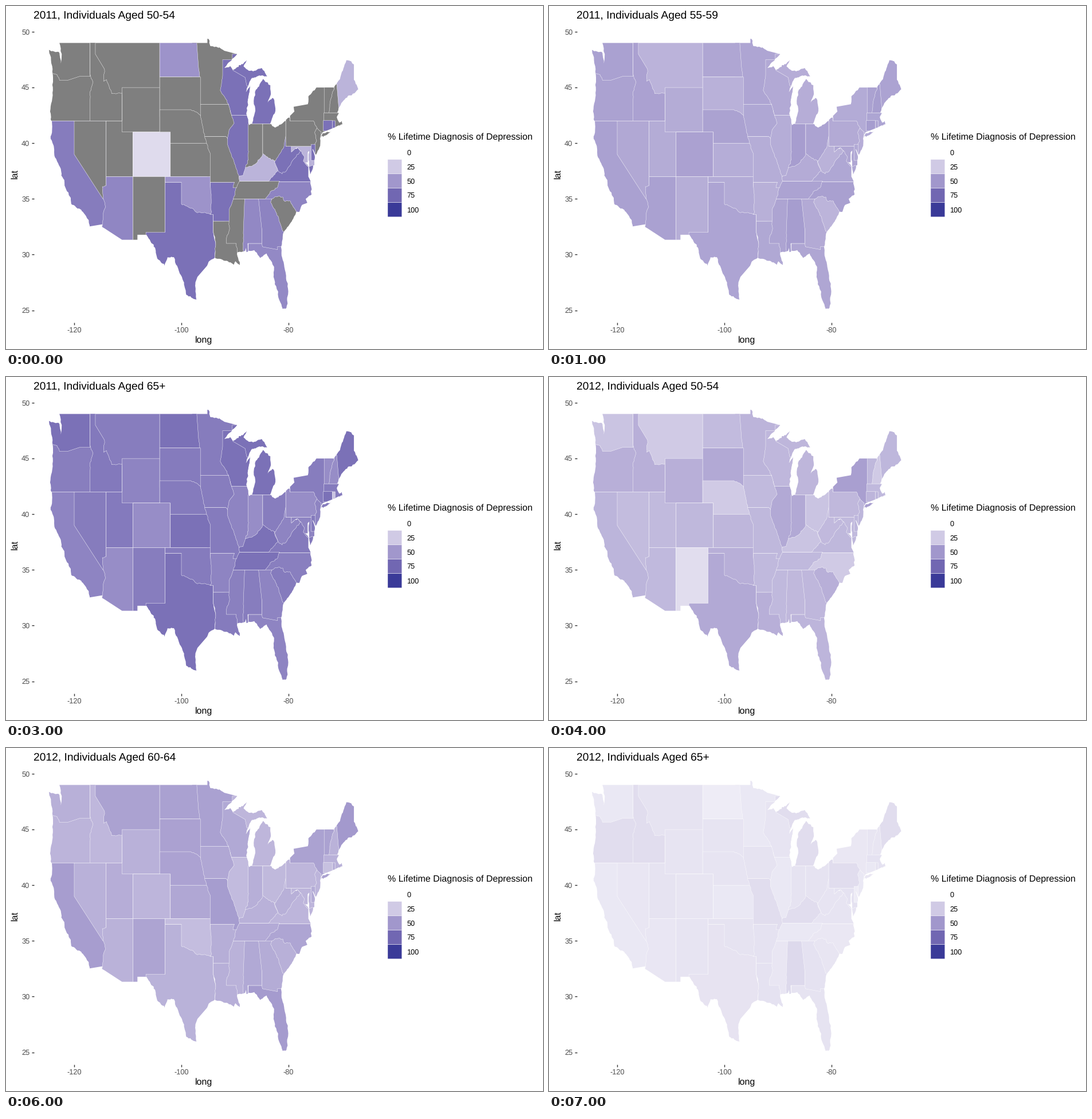
A matplotlib script for the animation above (8000 ms loop, 937 by 598 pixels).

```python
import numpy as np
import matplotlib.pyplot as plt
from matplotlib.animation import FuncAnimation
from matplotlib.patches import Polygon, Rectangle
from matplotlib.path import Path

W, H, DPI = 937, 598, 128
AGES = ["50-54", "55-59", "60-64", "65+"]
LONG_EDGE = 2  # degrees; longer edges stay straight
rng = np.random.default_rng(4)

plt.rcParams.update({"font.family": "Liberation Sans", "text.hinting": "none"})
fig = plt.figure(figsize=(W / DPI, H / DPI), dpi=DPI, facecolor="white")
ax = fig.add_axes([0, 0, 1, 1])
ax.set(xlim=(0, W), ylim=(H, 0))
ax.axis("off")


def px(west):
    return 306 + 9.35 * (100 - west)


def py(lat):
    return 45 + 19.42 * (50 - lat)


def shade(value):
    """White to deep blue; missing values are grey."""
    if value is None:
        return "#7f7f7f"
    stops = [0, 25, 50, 75, 100]
    r = np.interp(value, stops, [255, 208, 161, 113, 58])
    g = np.interp(value, stops, [255, 202, 151, 103, 58])
    b = np.interp(value, stops, [255, 229, 204, 178, 152])
    return (r / 255, g / 255, b / 255)


def label(x, y, text, size, color="black", **kw):
    return ax.text(x, y, text, fontsize=size * 72 / DPI, color=color, va="baseline", **kw)


def outline(numbers):
    """Pixel outline of (west, lat) pairs; short slanted edges wander like coasts and rivers."""
    points = np.reshape(numbers, (-1, 2)).astype(float)
    path = []
    for p, q in zip(points, np.roll(points, -1, axis=0)):
        path.append(p)
        length = np.hypot(*(q - p))
        if np.all(p != q) and length < LONG_EDGE:
            for t in np.arange(0.25, length - 0.1, 0.25) / length:
                path.append(p + t * (q - p) + rng.normal(0, (0.05, 0.03)))
    west, lat = np.transpose(path)
    return np.column_stack([px(west), py(lat)])


# Land outline, counterclockwise from the northwest
pacific = [
    122.76, 49, 122.5, 48.5, 122.35, 47.7, 122.5, 47.15, 122.75, 48.1, 124.7, 48.38,
    124.1, 46.9, 123.95, 45.5, 124.1, 44, 124.5, 42.85, 124.1, 41.5, 124.4, 40.4,
    123.8, 39.7, 123.7, 38.9, 122.5, 37.7, 122.4, 37.1, 121.85, 36.7, 121.8, 36.2,
    120.65, 35.1, 120.55, 34.55, 119.2, 34.15, 118.4, 33.85, 117.3, 33.1, 117.1, 32.53]
south = [
    114.72, 32.72, 114.8, 32.5, 111.07, 31.33, 108.2, 31.33, 108.2, 31.78, 106.5, 31.78,
    104.9, 30.6, 104.5, 29.65, 103.15, 29, 102.6, 29.75, 101.4, 29.77, 100.3, 28.3,
    99.5, 27.5, 99.1, 26.4, 97.2, 25.95]
gulf = [
    97.4, 27.3, 97, 28, 95.2, 29, 94.7, 29.45, 93.8, 29.72, 92.3, 29.53, 91.3, 29.4,
    90.2, 29.1, 89.9, 29.4, 89.1, 29.05, 89.5, 29.8, 89.6, 30.2, 88.1, 30.35, 87.95, 30.6,
    87.9, 30.25, 86.4, 30.4, 85.3, 29.7, 84.1, 30.1, 82.7, 28.9, 82.8, 28, 82.2, 26.9,
    81.75, 25.95, 81.1, 25.13, 80.4, 25.2]
atlantic = [
    80.05, 26.7, 80.55, 28.4, 81.3, 29.9, 81.4, 30.7, 80.9, 32.03, 79.3, 33.1, 78.55, 33.86,
    77.95, 33.87, 77.5, 34.45, 76.5, 34.65, 76.8, 35, 75.7, 35.4, 75.9, 36.6, 76.3, 37,
    76.3, 37.9, 77, 38.35, 76.45, 38.3, 76.45, 39.2, 76.1, 39.4, 76.25, 38.6, 75.97, 37.2,
    75.2, 38.05, 75.1, 38.75, 75.5, 39.5, 74.9, 38.95, 74.1, 39.75, 74.05, 40.6, 73.6, 41,
    71.5, 41.4, 70.65, 41.6, 69.95, 41.7, 70.1, 42, 70.55, 41.85, 71, 42.35, 70.65, 42.65,
    70.7, 43.1, 69.8, 43.8, 69, 44.2, 68.2, 44.3, 67, 44.85]
north = [
    67.45, 45.3, 67.8, 45.7, 67.8, 47.07, 68.3, 47.35, 69.2, 47.45, 70.05, 46.4, 70.4, 45.75,
    71.1, 45.3, 71.5, 45, 74.8, 45, 76.3, 44.2, 76.4, 43.5, 79.05, 43.27, 78.9, 42.85,
    81.2, 41.75, 82.5, 41.4, 83.45, 41.73]
lakes = [
    83.1, 42.2, 82.45, 42.9, 82.65, 43.85, 83, 44.07, 83.9, 43.65, 83.3, 44.4, 83.4, 45.2,
    84.75, 45.77, 85.5, 45.1, 86.1, 44.8, 86.5, 43.8, 86.2, 42.9, 86.8, 41.76, 87.4, 41.65,
    87.9, 42.7, 87.6, 43.9, 87.1, 45.2, 88, 44.55, 87.6, 45.1, 87, 45.75, 86.4, 45.9,
    85.5, 46.08, 84, 46, 85, 46.75, 86.6, 46.45, 87.4, 46.5, 88.4, 46.9, 87.8, 47.45,
    88.9, 47, 90.4, 46.55, 90.9, 46.9, 92.05, 46.72, 91.2, 47.25, 89.6, 48, 92, 48.3,
    92.9, 48.6, 94.6, 48.72, 94.9, 49.35, 95.15, 49.38, 95.15, 49]
island = [74, 40.6, 73.7, 40.85, 71.9, 41.07, 73.5, 40.58]

land = Path.make_compound_path(*(
    Path(np.vstack([ring, ring[:1]]), closed=True)
    for ring in (outline(pacific + south + gulf + atlantic + north + lakes), outline(island))))

states = {}


def state(name, *numbers):
    """Paint a state clipped to the land; four numbers mean a west, north, east, south box."""
    if len(numbers) == 4:
        w, n, e, s = numbers
        numbers = (w, n, e, n, e, s, w, s)
    shape = ax.add_patch(Polygon(outline(numbers), ec="white", lw=0.25,
                                 joinstyle="round", snap=False))
    shape.set_clip_path(land, ax.transData)
    states[name] = shape


# Later states cover earlier ones, so each border is given once.
state("MT", 117, 49.5, 104.05, 44.3)
state("OR", 125, 46.3, 116, 42)
state("WA", 125, 49.5, 117.03, 49.5, 117.03, 46, 119, 46, 121.2, 45.65, 122.75, 45.65,
      123.2, 46.15, 125, 46.3)
state("ID", 117.03, 49.5, 116.05, 49.5, 116.05, 48, 114.35, 46.65, 114.5, 45.56, 113.95, 45.7,
      113, 44.45, 111.05, 44.5, 111.05, 42, 117.03, 42, 117.03, 43.9, 117.1, 44.4,
      116.5, 45.5, 116.92, 46, 117.03, 46.43)
state("CA", 125, 42, 114, 32.4)
state("NV", 120, 42, 114.04, 42, 114.04, 35, 114.63, 35, 120, 39)
state("UT", 114.04, 42, 109.05, 37)
state("AZ", 114.04, 37, 109.05, 37, 109.05, 31, 115, 31, 114.72, 32.72, 114.5, 33.9,
      114.15, 34.27, 114.63, 35, 114.75, 36.1, 114.04, 36.2)
state("WY", 111.05, 45, 104.05, 41)
state("CO", 109.05, 41, 102.05, 37)
state("NM", 109.05, 37, 103.04, 31)
state("TX", 103.05, 36.5, 94.04, 36.5, 94.04, 32, 93.6, 31.1, 93.75, 29.8, 93.75, 25,
      106.62, 25, 106.62, 32, 103.05, 32)

state("MN", 98, 49.5, 89, 43.5)
state("MI", 90.5, 48, 82, 41.72)
state("WI", 92.3, 47.5, 90.4, 47.5, 90.4, 46.55, 88.1, 45.9, 87.7, 45.1, 86.9, 45.3, 87, 42.5,
      90.65, 42.5, 91.2, 43.5, 92.75, 44.75, 92.3, 46.1)
state("NC", 84.3, 36.55, 75, 33.8)
state("VA", 83.68, 39.5, 75, 36.55)
state("TN", 90.5, 36.6, 81.68, 36.6, 82, 36.1, 83.1, 35.75, 84.3, 35, 90.5, 35)
state("KY", 90, 36.6, 83.68, 36.6, 81.97, 37.54, 82.6, 38.3, 82.6, 39.2, 90, 39.2)
state("MD", 79.48, 39.72, 75, 39.72, 75, 38, 76.4, 37.9, 77.25, 38.4, 77.05, 38.8,
      77.75, 39.32, 78.35, 39.6, 79.48, 39.2)
state("WV", 80.52, 40.64, 80.52, 39.72, 79.48, 39.72, 79.48, 39.2, 78.35, 39.6, 77.75, 39.32,
      79.3, 38.42, 80.3, 37.6, 81.2, 37.25, 81.97, 37.54, 82.6, 38.3, 82.4, 38.9, 81.6, 39.6,
      80.85, 40.4)
state("IL", 92, 42.5, 87, 42.5, 87, 38.2, 88.05, 37.8, 88.5, 37.1, 89.2, 37, 92, 37)
state("IN", 87.53, 41.74, 84.82, 41.74, 84.82, 39, 85.8, 38.3, 86.8, 37.95, 88.05, 37.8,
      87.5, 38.5, 87.53, 39.35)
state("OH", 84.82, 41.73, 83.2, 41.73, 83.2, 42, 80.52, 42, 80.52, 40.64, 80.85, 39.7,
      81.8, 38.95, 82.5, 38.4, 83.7, 38.65, 84.82, 39.1)
state("IA", 96.6, 43.5, 91.2, 43.5, 90.65, 42.5, 90.15, 41.8, 91.1, 41.2, 91.4, 40.4,
      91.73, 40.6, 96.3, 40.6)
state("ND", 104.05, 49.5, 97.2, 49.5, 96.8, 46.8, 96.56, 45.94, 104.05, 45.94)
state("SD", 104.05, 45.94, 96.45, 42.4)
state("MS", 92, 35, 88.1, 30)
state("AR", 94.62, 36.5, 89.6, 36.5, 90.3, 35, 91.1, 34, 91.1, 33, 94.04, 33, 94.04, 33.6,
      94.62, 33.6)
state("MO", 96.5, 40.6, 91.73, 40.6, 91.4, 40.4, 91.4, 39.9, 90.65, 38.95, 90.2, 38.4,
      89.5, 37.3, 89.15, 36.6, 89.7, 36, 90.37, 36, 90.1, 36.5, 95, 36.5)
state("NE", 104.05, 43, 98.5, 43, 97.2, 42.8, 96.4, 42.5, 95.9, 41.2, 95.3, 40, 102.05, 40,
      102.05, 41, 104.05, 41)
state("KS", 102.05, 40, 95.3, 40, 94.62, 39.1, 94.62, 37, 102.05, 37)
state("OK", 103.04, 37, 94.62, 37, 94.62, 36.5, 94.43, 35.4, 94.48, 33.65, 96, 33.75,
      97.2, 33.8, 98.1, 34.15, 100, 34.56, 100, 36.5, 103.04, 36.5)
state("LA", 94.04, 33, 91.1, 33, 91, 32.3, 91.6, 31.4, 91.6, 31, 89.75, 31, 89.6, 30.2,
      89, 30, 88.5, 28.5, 93.75, 28.5, 93.75, 29.8, 93.6, 31.1, 94.04, 32)
state("FL", 87.5, 31, 79, 24)
state("AL", 88.2, 35, 85, 35, 85, 31, 87.6, 31, 87.5, 30, 88.4, 30, 88.45, 31.9)
state("SC", 83.6, 34.7, 83.1, 35, 82.4, 35.2, 81.05, 35.15, 80.8, 34.82, 79.67, 34.8,
      78.4, 33.7, 79, 31.5, 83.6, 31.5)
state("GA", 85.6, 35, 83.1, 35, 83.35, 34.7, 81.95, 33.45, 81.1, 32.1, 80, 32, 80, 30.72,
      82.05, 30.72, 82.05, 30.45, 84.87, 30.7, 85, 31, 85, 32.3)

state("ME", 71.1, 48, 66.5, 43)
state("NY", 79.76, 45.1, 71.8, 40.4)
state("PA", 80.52, 42.3, 79.76, 42.3, 79.76, 42, 75.35, 42, 74.7, 41.36, 74.7, 39.72,
      80.52, 39.72)
state("NJ", 75.1, 41, 74.7, 41.36, 73.9, 41, 74, 40.5, 73.8, 39.5, 74.9, 38.8, 75.5, 39.5,
      74.75, 40.2)
state("DE", 75.79, 39.9, 75, 38.46)
state("VT", 73.35, 45.1, 71.5, 42.73)
state("NH", 71.5, 45.3, 71, 45.3, 70.6, 43, 70.85, 42.73, 72.45, 42.73, 72.3, 43.5, 71.5, 45)
state("MA", 73.4, 42.73, 69.5, 41.4)
state("CT", 73.5, 42.04, 71.82, 41.1)
state("RI", 71.82, 42.02, 71.3, 41.2)

# Each step: usual level, spread, states without data, and levels of states that stand out
steps = [
    (60, 2, "WA OR ID MT NV UT NM WY SD NE KS MN IA MO LA MS TN IN OH PA NY NJ VT NH MA SC",
     {17: "CO", 36: "KY ME MD", 52: "ND OK", 70: "AR VA WV WI MI IL TX CT RI DE"}),
    (42, 4, "", {}),
    (21, 1, "", {1: "MD DE", 11: "CA CO NH FL", 18: "WI ND IL KS KY SC VT ME",
                 27: "ID UT OK OH PA NJ MS SD"}),
    (64, 1, "", {28: "RI", 55: "AZ CO IN PA VT NH", 60: "CA IL GA FL AR NJ WV WY MD",
                 70: "ND TX KS KY TN WI CT ME MI WA"}),
    (34, 1, "", {16: "NM", 25: "MT NE NC NH", 28: "WA OH KY", 38: "OR ID WY OK LA SC",
                 41: "SD TX IN IL", 46: "NY"}),
    (67, 1, "CA NV WA MN MO AR MI PA NY ME MA FL RI",
     {22: "GA", 60: "ID UT SD IA", 72: "WY AZ IN TN NJ TX", 78: "OR WI"}),
    (40, 4, "", {}),
    (13, 0.7, "", {9: "ND DE", 11: "WA MN IL KS TN NJ CT CA", 16: "OR ID MO KY MI ME PA",
                   18: "AL"}),
]


def fill_values(level, spread, missing, groups):
    values = {name: level + spread * rng.normal() for name in states}
    for value, names in groups.items():
        values.update(dict.fromkeys(names.split(), value))
    values.update(dict.fromkeys(missing.split()))
    return values


data = [fill_values(*step) for step in steps]

# Axes
tick = dict(color="#333333", lw=0.8, solid_capstyle="butt")
for lat in range(25, 51, 5):
    ax.plot([44.5, 48.5], [py(lat)] * 2, **tick)
    label(41.3, py(lat) + 4.6, str(lat), 12.76, "#4d4d4d", ha="right")
for west in (120, 100, 80):
    ax.plot([px(west)] * 2, [552, 556], **tick)
    label(px(west), 568.7, f"-{west}", 12.76, "#4d4d4d", ha="center")
label(345, 587, "long", 16, ha="center")
label(19.5, 292.5, "lat", 16, ha="center", rotation=90, rotation_mode="anchor")

# Legend
label(666, 232.5, "% Lifetime Diagnosis of Depression", 16)
for i in range(5):
    mid = 255 + 25.05 * i
    ax.add_patch(Rectangle((666, mid - 12.5), 24.8, 25.05, fc=shade(25 * i), ec="white",
                           lw=0.25, snap=False))
    label(699, mid + 4.6, str(25 * i), 12.76)

title = label(48.5, 22.5, "", 19.2)


def draw(i):
    title.set_text(f"{2011 + i // 4}, Individuals Aged {AGES[i % 4]}")
    for name, shape in states.items():
        shape.set_facecolor(shade(data[i][name]))
    return []


anim = FuncAnimation(fig, draw, frames=8, interval=1000, repeat=True, repeat_delay=0)
plt.show()
```
